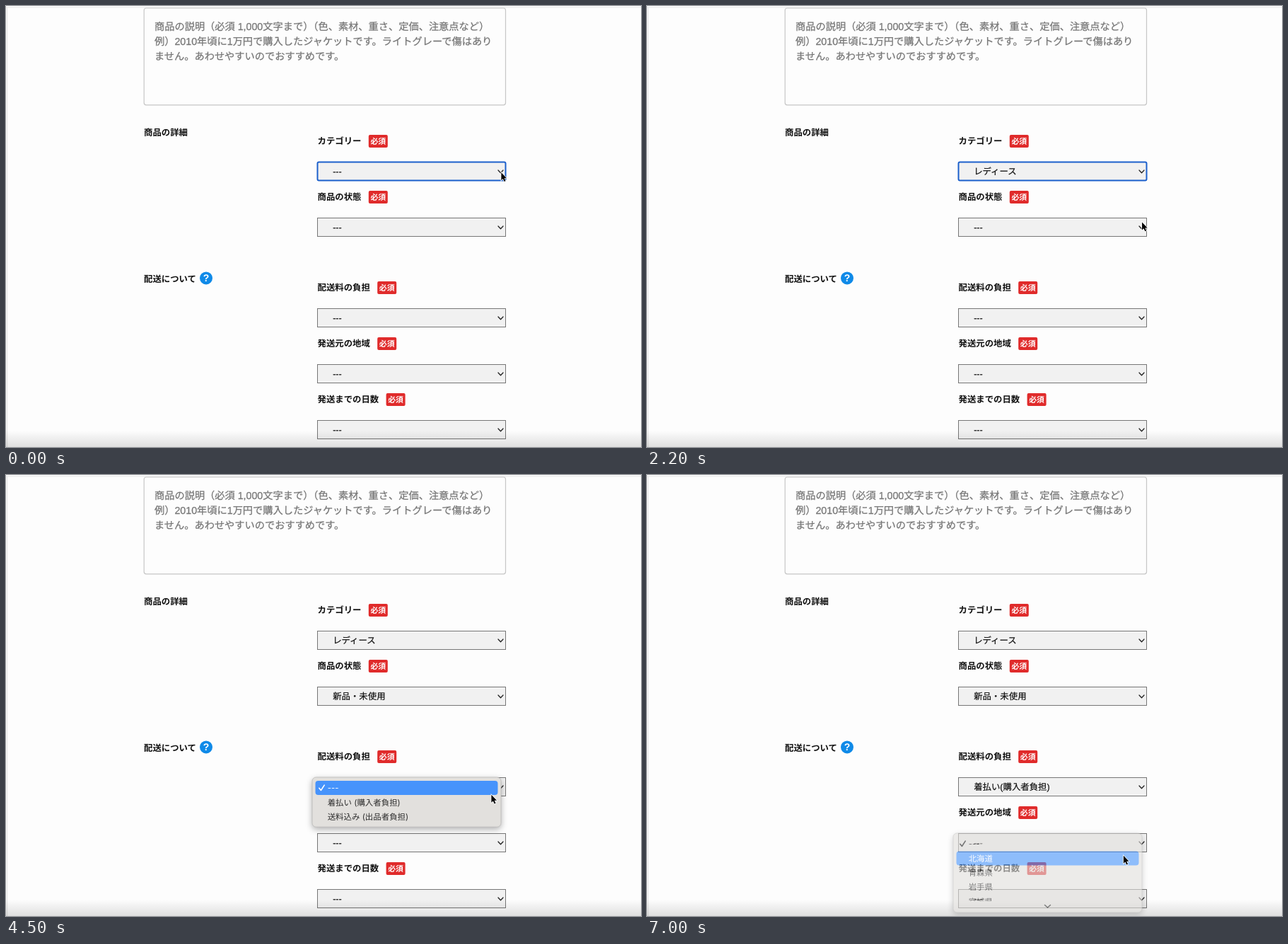
Animation, 898 px wide and 623 px high, one loop 7100 ms. Source, as an HTML page:

```html
<!DOCTYPE html>
<html lang="ja">
<head>
<meta charset="utf-8">
<title>商品の詳細フォーム</title>
<style>
  html, body { margin: 0; width: 100%; height: 100%; overflow: hidden; background: #fdfdfd; }
  svg { display: block; width: 898px; height: 623px; }
  text {
    font: 12.4px "Liberation Sans", "Noto Sans CJK JP", "Noto Sans CJK", sans-serif;
    text-rendering: geometricPrecision; white-space: pre;
  }
  .note { font-size: 14.22px; fill: #757575; stroke: #757575; stroke-width: .25px; }
  .value { fill: #111; stroke: #111; stroke-width: .2px; }
  .label { font-weight: 700; fill: #111; }
  .badge { font-size: 10.9px; font-weight: 700; fill: #fff; }
  .help { font-size: 14px; font-weight: 700; fill: #fff; text-anchor: middle; }
  .item { font-family: Inter, "Noto Sans CJK JP", "Noto Sans CJK", sans-serif; font-size: 11.45px; fill: #2b2b2b; }
  .line { fill: none; stroke-linecap: round; stroke-linejoin: round; }
  .panel { filter: drop-shadow(0 3px 4px rgba(0, 0, 0, .3)); }
</style>
</head>
<body>
<script>
const LOOP = 7100, STEP = 100, ROW = 20.4;

const fields = [
  { label: 'カテゴリー', y: 234, open: 200, close: 1400,
    items: ['---', 'レディース', 'メンズ', 'ベビー・キッズ', 'インテリア・住まい・小物', '本・音楽・ゲーム',
      'おもちゃ・ホビー・グッズ', '家電・スマホ・カメラ', 'スポーツ・レジャー', 'ハンドメイド', 'その他'] },
  { label: '商品の状態', y: 313, open: 2300, close: 3200,
    items: ['---', '新品・未使用', '未使用に近い', '目立った傷や汚れなし', 'やや傷や汚れあり',
      '傷や汚れあり', '全体的に状態が悪い'] },
  { label: '配送料の負担', y: 441, open: 4100, close: 4900,
    items: ['---', '着払い(購入者負担)', '送料込み(出品者負担)'] },
  { label: '発送元の地域', y: 520, open: 5800, close: 7000, height: 112,
    items: ['---', '北海道', '青森県', '岩手県', '宮城県'] },
  { label: '発送までの日数', y: 599 }
];

// time, x, y of the pointer tip
const path = [
  [0, 700, 234.5], [300, 699, 234], [1000, 688.5, 246], [1400, 690.5, 254], [1600, 692, 261],
  [2000, 705, 290], [2300, 697, 312], [2600, 689, 319], [3000, 682, 335], [3300, 684, 341],
  [3700, 705, 395], [4100, 697, 438], [4500, 686, 451], [4800, 684, 462], [5100, 685, 467],
  [5400, 692, 502], [5700, 697, 518], [5900, 692, 521], [6400, 678, 532], [7000, 673.5, 537]
];

function el(parent, tag, attrs = {}, text = '') {
  const node = document.createElementNS('http://www.w3.org/2000/svg', tag);
  for (const key in attrs) node.setAttribute(key, attrs[key]);
  node.textContent = text;
  return parent.appendChild(node);
}
const rect = (parent, x, y, width, height, rx, attrs) =>
  el(parent, 'rect', { x, y, width, height, rx, ...attrs });
// y is the vertical middle of the glyph box
const write = (parent, cls, x, y, size, text) =>
  el(parent, 'text', { class: cls, x, y: y + size * 0.37 }, text);
const line = (parent, d, stroke, width) =>
  el(parent, 'path', { class: 'line', d, stroke, 'stroke-width': width });
const show = (node, on) => node.setAttribute('visibility', on ? 'visible' : 'hidden');

const svg = el(document.body, 'svg', { viewBox: '0 0 898 623' });
const defs = el(svg, 'defs');
const fade = el(defs, 'linearGradient', { id: 'fade', x1: 0, y1: 0, x2: 0, y2: 1 });
el(fade, 'stop', { offset: 0, 'stop-color': '#000', 'stop-opacity': 0 });
el(fade, 'stop', { offset: 1, 'stop-color': '#000', 'stop-opacity': 0.12 });

function drawPage() {
  rect(svg, 0, 0, 898, 623, 0, { fill: '#fdfdfd' });
  rect(svg, 0, 1.5, 898, 1, 0, { fill: '#e6e6e6' });
  rect(svg, 1, 2, 1.2, 621, 0, { fill: '#e6e6e6' });
  rect(svg, 195.2, 3, 511.3, 136.8, 3, { fill: '#fdfdfd', stroke: '#c6c6c6', 'stroke-width': 1.2 });
  ['商品の説明（必須 1,000文字まで）（色、素材、重さ、定価、注意点など）',
    '例）2010年頃に1万円で購入したジャケットです。ライトグレーで傷はあり',
    'ません。あわせやすいのでおすすめです。'
  ].forEach((text, i) => write(svg, 'note', 210, 28.7 + 21.2 * i, 14.1, text));
  write(svg, 'label', 195, 178, 12.4, '商品の詳細');
  write(svg, 'label', 195, 385, 12.4, '配送について');
  el(svg, 'circle', { cx: 283, cy: 384.4, r: 9, fill: '#0f8ae8' });
  el(svg, 'text', { class: 'help', x: 283, y: 389.3 }, '?');
}

function drawField(f) {
  const badgeX = 440.5 + 12.4 * f.label.length + 10.3;
  write(svg, 'label', 440.5, f.y - 43.7, 12.4, f.label);
  rect(svg, badgeX, f.y - 52, 27, 18, 2, { fill: '#e02b2b' });
  write(svg, 'badge', badgeX + 2.6, f.y - 42.8, 10.9, '必須');
  f.box = rect(svg, 440.5, f.y - 13.5, 266, 26, 0, { fill: '#f1f1f1' });
  f.value = write(svg, 'value', 462.2, f.y - 0.6, 12.4, '---');
  line(svg, `M696 ${f.y - 2}l3.5 3.7l3.5 -3.7`, '#222', 1.3);
}

function drawMenu(f, i) {
  const top = f.y - 14, height = f.height || f.items.length * ROW + 9;
  f.top = top;
  f.menu = el(svg, 'g');
  rect(f.menu, 433, top, 267, height, 5.5,
    { class: 'panel', fill: '#e2e0dd', stroke: '#b9b8b6', 'stroke-width': 0.8 });
  const clip = el(defs, 'clipPath', { id: 'clip' + i });
  rect(clip, 433, top, 267, f.height ? height - 16 : height, 0);
  const list = el(f.menu, 'g', { 'clip-path': `url(#clip${i})` });
  f.bar = rect(list, 437.5, 0, 258, 20, 4, { fill: '#4693fb' });
  f.rows = f.items.map((text, n) =>
    write(list, 'item', 454.7, top + 15 + ROW * n, 11.45, text.replace('(', ' (')));
  f.check = line(list, `M442.8 ${top + 15.3}l2.6 3.2l4.8 -7.4`, '#222', 1.6);
  if (f.height) line(f.menu, `M562.5 ${top + 101.5}l4 3.6l4 -3.6`, '#333', 1.4);
}

drawPage();
fields.forEach(drawField);
rect(svg, 0, 600, 898, 23, 0, { fill: 'url(#fade)' });
const menus = fields.filter(f => f.items);
menus.forEach(drawMenu);
const pointer = el(svg, 'path', {
  d: 'M.4 .8V11.8L2.8 9.5L4.7 13.6L6.5 12.8L4.7 8.8H8Z',
  fill: '#000', stroke: '#fff', 'stroke-width': 1.4, 'paint-order': 'stroke'
});

function pointerAt(t) {
  const n = path.findIndex(p => p[0] > t);
  if (n < 0) return path[path.length - 1].slice(1);
  const [t0, x0, y0] = path[n - 1], [t1, x1, y1] = path[n];
  const k = (t - t0) / (t1 - t0);
  return [x0 + (x1 - x0) * k, y0 + (y1 - y0) * k];
}

function menuOpacity(f, t) {
  if (t < f.open || t >= f.close + 200) return 0;
  if (t < f.close) return 1;
  return t < f.close + 100 ? 0.6 : 0.1;
}

function updateMenu(f, t, y) {
  const alpha = menuOpacity(f, t);
  show(f.menu, alpha > 0);
  f.menu.setAttribute('opacity', alpha);
  const hover = t >= f.close ? 1 : Math.max(0, Math.min(1, Math.floor((y - f.top - 5) / ROW)));
  f.bar.setAttribute('y', f.top + 5 + ROW * hover);
  f.rows.forEach((row, n) => row.style.fill = n === hover ? '#fff' : '');
  f.check.setAttribute('stroke', hover ? '#222' : '#fff');
  f.value.textContent = f.items[t >= f.close + 200 ? 1 : 0];
}

function focusedField(t) {
  if (t < menus[0].open) return menus[0];
  return menus.find((f, i) => t >= f.close + 200 && menus[i + 1] && t < menus[i + 1].open);
}

function render(time) {
  const t = Math.floor(time % LOOP / STEP) * STEP;
  const [x, y] = pointerAt(t), focused = focusedField(t);
  pointer.setAttribute('transform', `translate(${x} ${y})`);
  menus.forEach(f => updateMenu(f, t, y));
  fields.forEach(f => {
    const on = f === focused;
    f.box.setAttribute('stroke', on ? '#1c60cc' : '#767676');
    f.box.setAttribute('stroke-width', on ? 2 : 1);
    f.box.setAttribute('rx', on ? 2 : 0);
  });
}

const start = performance.now();
function tick() {
  render(performance.now() - start);
  requestAnimationFrame(tick);
}
tick();
</script>
</body>
</html>
```
